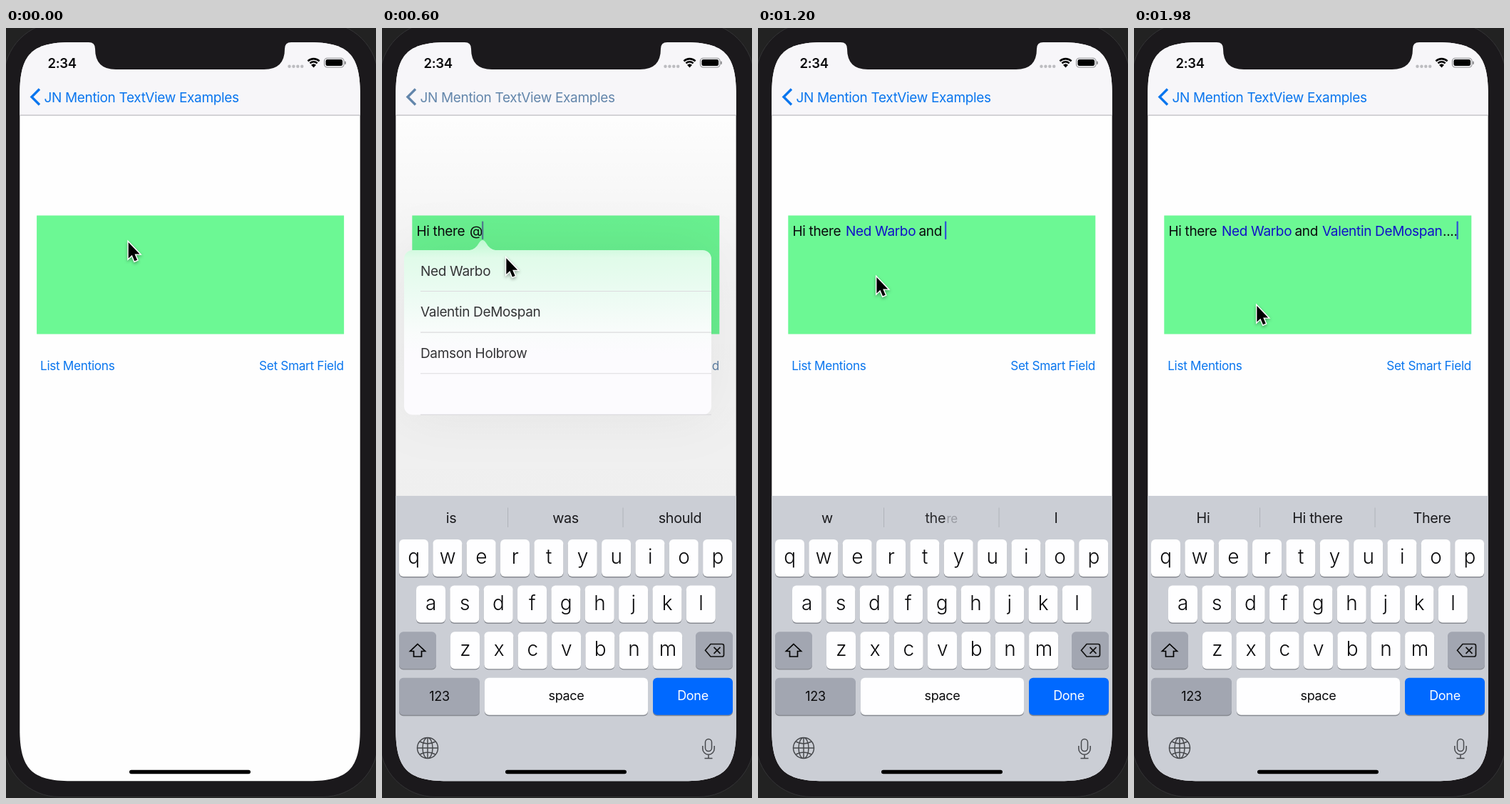
Recreate the animation shown at these times as an HTML page with a canvas. Size 519 px wide and 1078 px high, loop 2010 ms.

```html
<!DOCTYPE html>
<html lang="en">
<head>
<meta charset="utf-8">
<title>Mention text view</title>
<style>
html, body { margin: 0; height: 100%; overflow: hidden; background: #1b191c; }
canvas { display: block; }
</style>
</head>
<body>
<canvas id="stage" width="519" height="1078"></canvas>
<script>
const ctx = document.getElementById('stage').getContext('2d');
const LOOP = 2010, STEP = 30;
const PEOPLE = ['Ned Warbo', 'Valentin DeMospan', 'Damson Holbrow'];
const INK = '#0a0a0c', BODY = 19, MENTION = '#1010c8';

const clamp = v => Math.max(0, Math.min(1, v));
const ramp = (t, from, to) => clamp((t - from) / (to - from));
const smooth = k => k * k * (3 - 2 * k);
const mix = (a, b, k) => `rgb(${a.map((v, i) => Math.round(v + (b[i] - v) * k))})`;
// Last entry whose start time has passed.
const at = (list, t) => list.filter(e => e[0] <= t).pop();

function setFont(size, weight = 400) {
  ctx.font = `${weight} ${size}px Inter, sans-serif`;
  ctx.letterSpacing = -0.018 * size + 'px';
}

function text(str, x, y, size, color = INK, align = 'left', weight = 400) {
  setFont(size, weight);
  ctx.textAlign = align;
  ctx.fillStyle = color;
  ctx.fillText(str, x, y);
}

function box(x, y, w, h, r, color) {
  ctx.beginPath();
  ctx.roundRect(x, y, w, h, r);
  ctx.fillStyle = color;
  ctx.fill();
}

function shape(d, { fill, stroke, width = 1.8 }) {
  const path = new Path2D(d);
  if (fill) { ctx.fillStyle = fill; ctx.fill(path); }
  if (stroke) { ctx.strokeStyle = stroke; ctx.lineWidth = width; ctx.stroke(path); }
}

function fade(y0, y1, stops) {
  const gradient = ctx.createLinearGradient(0, y0, 0, y1);
  for (const [pos, color] of stops) gradient.addColorStop(pos, color);
  return gradient;
}

function bezel() {
  ctx.fillStyle = '#222222';
  ctx.fillRect(0, 0, 519, 1078);
  box(-3, -8, 525, 1084.5, 78, '#1b191c');
  ctx.strokeStyle = '#343436';
  ctx.lineWidth = 1;
  ctx.stroke();
}

// Screen outline with smooth, continuous corners.
function screenPath() {
  const l = 19.3, r = 496.7, t = 20, b = 1054.3, e = 72, c = 17;
  return new Path2D(`M${l} ${t + e}C${l} ${t + c} ${l + c} ${t} ${l + e} ${t}H${r - e}` +
    `C${r - c} ${t} ${r} ${t + c} ${r} ${t + e}V${b - e}C${r} ${b - c} ${r - c} ${b} ${r - e} ${b}` +
    `H${l + e}C${l + c} ${b} ${l} ${b - c} ${l} ${b - e}Z`);
}

function statusBar() {
  text('2:34', 58.5, 55.5, 18.5, INK, 'left', 600);
  for (let i = 0; i < 4; i++) box(395.3 + i * 5.9, 51.5, 4.4, 4.4, 2.2, '#bcbcc0');
  ctx.strokeStyle = '#000';
  ctx.lineWidth = 2.6;
  for (const r of [7.2, 11.4]) {
    ctx.beginPath();
    ctx.arc(431.5, 54.5, r, -Math.PI * 0.75, -Math.PI * 0.25);
    ctx.stroke();
  }
  shape('M431.5 55.5L428 51.8Q431.5 48.8 435 51.8Z', { fill: '#000' });
  box(446.5, 42.2, 27.5, 12.8, 4, '#f7f7fa');
  ctx.strokeStyle = '#8d8d90';
  ctx.lineWidth = 1.1;
  ctx.stroke();
  box(448.4, 44.1, 23.7, 9, 2.4, '#000');
  box(475, 46.5, 1.8, 4.4, 1, '#8d8d90');
}

function navBar(tint) {
  box(19, 20, 478, 102, 0, '#f7f6f9');
  box(19, 121.5, 478, 1.2, 0, '#bdbcc0');
  statusBar();
  shape('M47 85.5L36 96.5L47 107.5', { stroke: tint, width: 3.4 });
  text('JN Mention TextView Examples', 53.5, 103.5, BODY, tint);
}

// Typed pieces with their starting x and colour.
function pieces(t) {
  const typed = (str, start, pace) => str.slice(0, Math.max(0, Math.floor((t - start) / pace) + 1));
  if (t < 800) {
    const s = typed('Hi there @', 280, 24);
    return [[s.slice(0, 9), 48.5, INK], [s.slice(9), 123, INK]];
  }
  const list = [['Hi there ', 48.5, INK], [PEOPLE[0] + ' ', 123, MENTION]];
  if (t < 1090) return list;
  if (t < 1580) {
    const s = typed('and @', 1090, 30);
    list.push([s.slice(0, 4), 225.5, INK], [s.slice(4), 264, INK]);
  } else {
    list.push(['and ', 225.5, INK], [PEOPLE[1] + ' ', 264, MENTION], [typed('....', 1700, 60), 433, INK]);
  }
  return list;
}

function editor(t, dim, tint) {
  const dx = t < 90 ? 0.5 : -0.3;
  box(42.6 + dx, 262.5, 431, 166, 0, '#6cf894');
  let caret = 47;
  for (const [str, x, color] of pieces(t)) {
    if (!str) continue;
    text(str, x, 290.5, BODY, color);
    caret = x + ctx.measureText(str).width - 1;
  }
  if (t >= 150) box(caret, 270.5, 2.3, 25.5, 1, mix([48, 84, 214], [84, 130, 148], dim));
  text('List Mentions', 47.5 + dx, 479, 17.2, tint);
  text('Set Smart Field', 473.3 + dx, 479, 17.2, tint, 'right');
}

function popover(x, tip, selected, alpha) {
  const top = 311, row = 57.6, width = 431;
  ctx.save();
  ctx.beginPath();
  ctx.rect(19, 123, 478, 532);
  ctx.clip();
  ctx.globalAlpha = alpha;
  box(19, 123, 478, 532, 0,
    fade(123, 655, [[0, 'rgba(0,0,0,.005)'], [0.35, 'rgba(0,0,0,.045)'], [1, 'rgba(0,0,0,.06)']]));

  const path = new Path2D();
  path.roundRect(x, top, width, row * 4, 12);
  path.addPath(new Path2D(`M${tip - 18} ${top}q8 -1 13 -10q5 -8 10 0q5 9 13 10Z`));
  ctx.fillStyle = fade(297, 541,
    [[0, '#bff9d2'], [0.1, '#e0fbe9'], [0.3, '#ebfbf2'], [0.53, '#f9fcfb'], [0.65, '#fcfbfe']]);
  ctx.shadowColor = 'rgba(0,0,0,.06)';
  ctx.shadowBlur = 80;
  ctx.fill(path);
  ctx.shadowColor = 'transparent';

  for (let i = 1; i < 5; i++) box(x + 23, top + row * i - 0.6, width - 23, 1.1, 0, '#dcdbde');
  if (selected >= 0) {
    box(x, top + row * selected, width, row, selected ? 0 : [12, 12, 0, 0], '#d9d8db');
  }
  PEOPLE.forEach((name, i) => text(name, x + 23, 346.5 + row * i, BODY, '#343436'));
  ctx.restore();
}

const HINTS = [
  [0, 'Hi', 'Hi there', 'There'],
  [345, '“H”', 'Hi', 'Hi there'],
  [400, '“the”', 'the', 'there'],
  [500, 'is', 'was', 'should'],
  [1125, '“an”', 'and', 'any'],
  [1185, 'w', 'the|re', 'I'],
  [1225, 'we', 'the', 'I'],
  [1290, 'is', 'was', 'should'],
  [1760, 'Hi', 'Hi there', 'There']
];

function hint(str, x) {
  const [solid, faint] = str.split('|');
  if (!faint) return text(str, x, 692.7, 19.8, '#1b1b1e', 'center');
  text(solid, x - 23, 692.7, 19.8, '#2b2b2e');
  text(faint, x + 7, 692.7, 17, '#9a9ca3');
}

function key(x, y, w, color = '#fefeff') {
  box(x, y + 1.4, w, 52, 6, '#878a91');
  box(x, y, w, 52, 6, color);
}

function globe(x, y) {
  ctx.strokeStyle = '#47494d';
  ctx.lineWidth = 1.5;
  ctx.beginPath();
  for (const rx of [14.5, 7]) {
    ctx.moveTo(x + rx, y);
    ctx.ellipse(x, y, rx, 14.5, 0, 0, 7);
  }
  ctx.stroke();
  shape(`M${x} ${y - 14.5}v29M${x - 14.5} ${y}h29M${x - 11} ${y - 9}q11 6 22 0M${x - 11} ${y + 9}q11 -6 22 0`,
    { stroke: '#47494d', width: 1.5 });
}

function keyboard(t) {
  const k = ramp(t, 130, 214);
  if (!k) return;
  const upper = t < 280, gray = '#a2a6b1';
  ctx.save();
  ctx.translate(0, Math.round(399 * (1 - k) ** 3));
  box(19, 655, 478, 400, 0, '#cbced5');
  for (const x of [176, 337.5]) box(x, 671.5, 1.1, 27.5, 0, '#b2b5bc');
  at(HINTS, t).slice(1).forEach((str, i) => hint(str, 97 + i * 160.5));

  [['qwertyuiop', 24], ['asdfghjkl', 48], ['zxcvbnm', 96]].forEach(([letters, left], r) => {
    [...letters].forEach((c, i) => {
      const x = left + i * 47.35, y = 716 + r * 64.6;
      key(x, y, 41);
      if (upper) text(c.toUpperCase(), x + 20.5, y + 35.5, 26, INK, 'center');
      else text(c, x + 20.5, y + 34, 28, INK, 'center', 350);
    });
  });

  key(24, 845.2, 52, upper ? '#fefeff' : gray);
  shape('M50 862.5L60.5 872.5H55.5V880H44.5V872.5H39.5Z',
    { fill: upper ? '#000' : null, stroke: '#000', width: 1.7 });
  key(440, 845.2, 52, gray);
  shape('M453.5 871.3L461 862.5H477Q479.5 862.5 479.5 865V877.5Q479.5 880 477 880H461ZM465.5 866.8l9 9m0 -9l-9 9',
    { stroke: '#111', width: 1.7 });

  key(24, 909.8, 113, gray);
  text('123', 80.5, 942, 18, INK, 'center');
  key(144, 909.8, 229);
  text('space', 258.5, 940.5, 18, INK, 'center');
  key(380, 909.8, 112, '#0069ff');
  text('Done', 436, 940.8, 18, '#fff', 'center');

  globe(64, 1008);
  shape('M453.5 1000a4.5 4.5 0 0 1 9 0v8a4.5 4.5 0 0 1 -9 0ZM449.8 1005v4a8.2 8.2 0 0 0 16.4 0v-4M458 1017.5v5M452.5 1022.5h11',
    { stroke: '#47494d', width: 1.5 });
  ctx.restore();
}

function pointer(t) {
  const a = smooth(ramp(t, 0, 120)), b = smooth(ramp(t, 590, 770)), c = smooth(ramp(t, 1330, 1540));
  ctx.save();
  ctx.translate(171.7 + 2.7 * a - 8 * b + 6 * c, 300 + 22 * a + 27 * b + 40 * c);
  const arrow = new Path2D('M0 0V22.5L5 17.8L8.6 26.3L12.4 24.7L8.8 16.4H15.8Z');
  ctx.lineJoin = 'miter';
  ctx.strokeStyle = '#fff';
  ctx.lineWidth = 2.8;
  ctx.shadowColor = 'rgba(0,0,0,.35)';
  ctx.shadowBlur = 4;
  ctx.shadowOffsetY = 2;
  ctx.stroke(arrow);
  ctx.shadowColor = 'transparent';
  ctx.fillStyle = '#000';
  ctx.fill(arrow);
  ctx.restore();
}

const screen = screenPath();

function draw() {
  const t = Math.floor(performance.now() / STEP + 0.05) * STEP % LOOP;
  const first = ramp(t, 505, 560) - ramp(t, 845, 905);
  const second = ramp(t, 1250, 1310) - ramp(t, 1585, 1660);
  const dim = Math.max(first, second);
  const tint = mix([10, 118, 238], [99, 134, 171], dim);

  bezel();
  ctx.save();
  ctx.clip(screen);
  box(19, 20, 478, 1035, 0, '#fefefe');
  navBar(tint);
  editor(t, dim, tint);
  if (first > 0) popover(31, 141, t < 800 ? -1 : 0, first);
  if (second > 0) popover(54, 283, t < 1575 ? -1 : 1, second);
  keyboard(t);
  box(173, 1038.7, 170, 5.6, 2.8, '#000');
  ctx.restore();
  shape('M116 19V20Q125 20 125 29Q125 58 154 58H362Q391 58 391 29Q391 20 400 20V19Z', { fill: '#1b191c' });
  pointer(t);
  requestAnimationFrame(draw);
}
draw();
</script>
</body>
</html>
```
